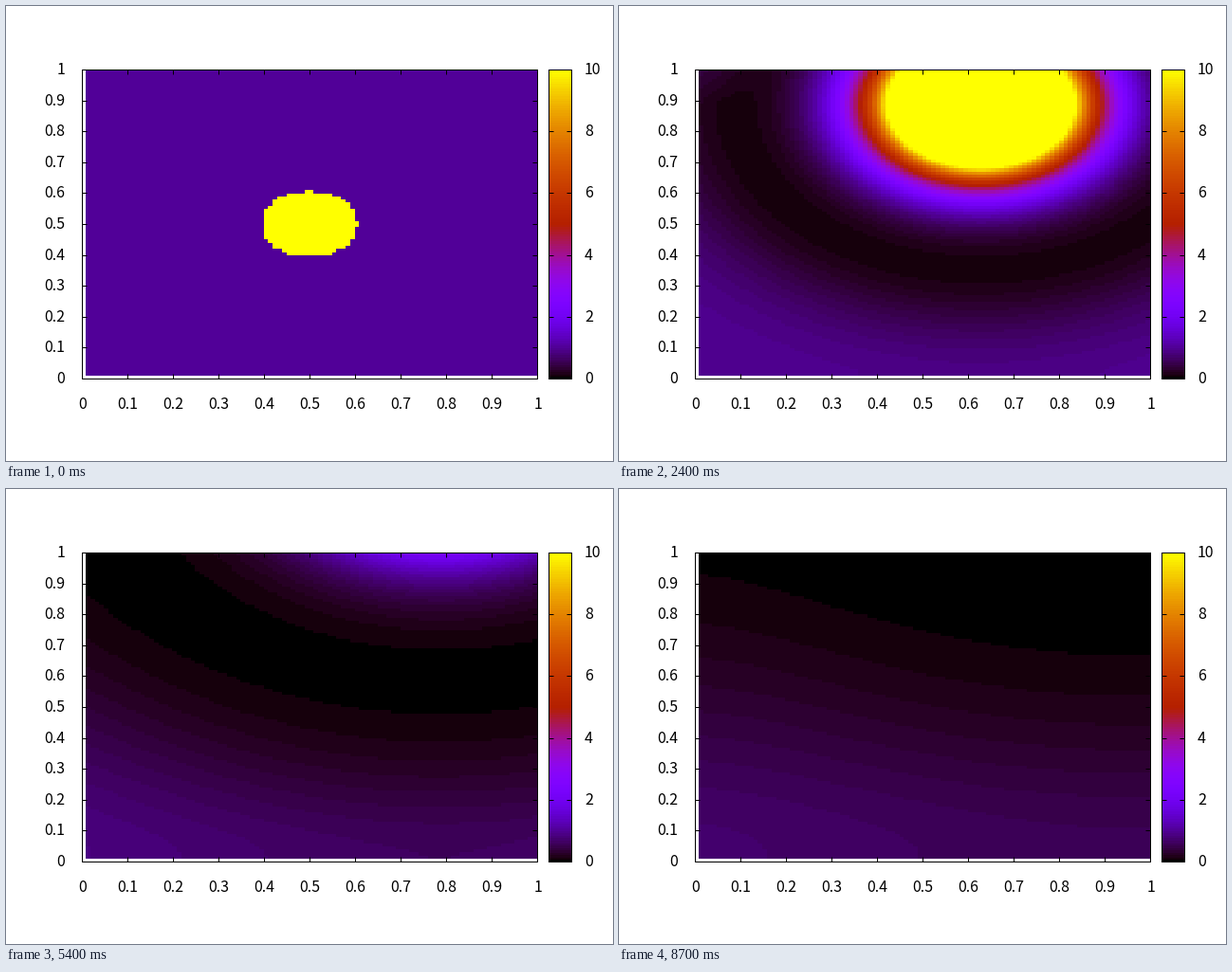
Write a matplotlib script that moves like this. It is 640 by 480 pixels and loops after 9000 ms.

```python
import numpy as np
import matplotlib.pyplot as plt
from matplotlib.animation import FuncAnimation

FRAMES, INTERVAL = 30, 300
W, H, DPI = 640, 480, 100
LEFT, RIGHT, TOP, BOTTOM = 80.5, 560.5, 67.5, 393.5
BAR_L, BAR_R = 572.5, 596.5
TICK = 5
LEVELS = 128
V_MAX = 10
REST = 1.02

grid = np.arange(1, 101) / 100
X, Y = np.meshgrid(grid, grid)


def field(n):
    """Concentration on the grid points at step n."""
    if n == 0:
        # the tiny offset settles which points on the rim count as inside
        inside = (X - 0.5001) ** 2 + (Y - 0.5001) ** 2 <= 0.01
        return np.where(inside, 100.0, REST)

    # the blob drifts steadily up and to the right
    dx, dy = X - 0.5 - 0.0161 * n, Y - 0.5 - 0.0485 * n
    r = np.hypot(dx, dy)

    # it spreads and fades
    blob = np.exp(4.55 - 0.077 * n - r ** 1.5 / (0.026 + 0.004 * n))

    # background eaten away around it, bent by the left and lower walls
    y_wall = np.cbrt(Y ** 3 + (0.005 * n) ** 3) - Y
    wake = (2.1 + 8 / n
            - (dx ** 2 + (dy + y_wall) ** 2) / (0.0054 * n ** 1.57)
            + 0.0004 * n ** 2 * np.exp(-X / 0.2))

    # passing crest on the leading side
    crest = (0.5 * np.exp(-((n - 5) / 5) ** 2)
             * np.exp(-((r - 0.34 - 0.033 * n) / 0.1) ** 2)
             * np.clip(dy / 0.2, 0, 1))
    return blob + REST * np.exp(-np.exp(wake)) + crest


def palette(gray):
    g = np.clip(np.floor(gray * LEVELS), 0, LEVELS - 1) / (LEVELS - 1)
    blue = np.clip(np.sin(2 * np.pi * g), 0, 1)
    return np.stack([np.sqrt(g), g ** 3, blue], axis=-1)


def cells(n):
    u = field(n)
    mean = (u[:-1, :-1] + u[1:, :-1] + u[:-1, 1:] + u[1:, 1:]) / 4
    return palette(mean / V_MAX)


fig = plt.figure(figsize=(W / DPI, H / DPI), dpi=DPI, facecolor="white")
ax = fig.add_axes([0, 0, 1, 1])
ax.set_axis_off()

# lines sit on pixel centres, so snapping is off
stroke = dict(colors="black", linewidth=72 / DPI, zorder=3, snap=False)
font = dict(family="Noto Sans CJK JP", fontsize=11.5, color="black",
            va="baseline")
raster = dict(origin="lower", interpolation="nearest", aspect="auto", zorder=1)


def frame(x0, x1):
    ax.hlines([TOP, BOTTOM], x0 - 0.5, x1 + 0.5, **stroke)
    ax.vlines([x0, x1], TOP, BOTTOM, **stroke)


def side_ticks(ys, x0, x1):
    ax.hlines(ys, x0, x0 + TICK, **stroke)
    ax.hlines(ys, x1 - TICK, x1, **stroke)


image = ax.imshow(cells(0), extent=(84, 560, 390, 67), **raster)
bar = palette((np.arange(LEVELS) + 0.5) / LEVELS)[:, None, :]
ax.imshow(bar, extent=(572, 597, 394, 67), **raster)

frame(LEFT, RIGHT)
frame(BAR_L, BAR_R)

steps = np.arange(11) / 10
xs = LEFT + (RIGHT - LEFT) * steps
ys = np.floor(BOTTOM - (BOTTOM - TOP) * steps) + 0.5
side_ticks(ys, LEFT, RIGHT)
ax.vlines(xs, TOP, TOP + TICK, **stroke)
ax.vlines(xs, BOTTOM - TICK, BOTTOM, **stroke)
side_ticks(ys[::2], BAR_L, BAR_R)

for s, x, y in zip(steps, xs, ys):
    ax.text(62, y + 4.5, f"{s:g}", ha="right", **font)
    ax.text(x, 425, f"{s:g}", ha="center", **font)
for s, y in zip(steps[::2], ys[::2]):
    ax.text(610, y + 4.5, f"{s * V_MAX:g}", ha="left", **font)

ax.set_xlim(0, W)
ax.set_ylim(H, 0)


def update(n):
    image.set_data(cells(n))
    return (image,)


anim = FuncAnimation(fig, update, frames=FRAMES, interval=INTERVAL,
                     repeat=True, repeat_delay=0)
plt.show()
```
